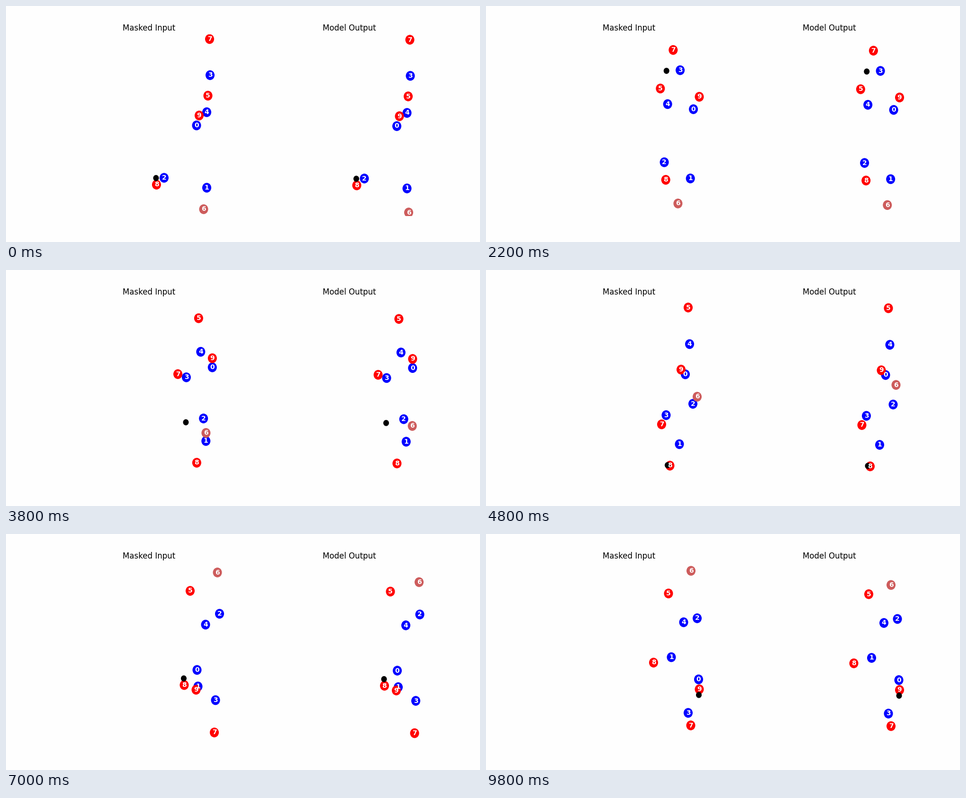
Write a matplotlib script that moves like this. It is 1000 px wide and 500 px high and loops after 10 s.

```python
import numpy as np
import matplotlib.pyplot as plt
from matplotlib.animation import FuncAnimation
from matplotlib.patches import Ellipse

WIDTH, HEIGHT = 1000, 500
FRAMES, INTERVAL = 50, 200
NOW = np.arange(FRAMES)
KEYS = np.array([0, 7, 14, 24, 35, 42, 49])
MASKED = 6
OUTPUT_SHIFT = (422.5, 1.5)

# Where each player runs: one stage position per key time.
ROUTES = [
    [(402, 253), (424.5, 239), (443.5, 206), (420.5, 221), (403, 288), (437, 289), (448.5, 308)],
    [(423.5, 385), (426, 380), (433, 356), (408, 369), (405, 323), (390, 270.5), (391, 261)],
    [(333.5, 364), (356, 330), (392, 331.5), (436.5, 283.5), (450.5, 169), (445.5, 153.5), (445.5, 178.5)],
    [(430.5, 146.5), (429, 131), (394.5, 152), (380, 307.5), (442, 352), (431, 381.5), (426.5, 379)],
    [(423.5, 225), (382, 219.5), (390.5, 197), (429.5, 157), (421, 192), (415, 190), (417, 187)],
    [(426, 190), (363.5, 211), (380, 142), (426.5, 79.5), (388.5, 120.5), (385, 126), (385, 126)],
    [(417, 430.5), (413.5, 427), (402, 403), (445.5, 268.5), (446, 81.5), (429.5, 79), (432.5, 78)],
    [(429.5, 70), (425, 75), (373, 120.5), (370.5, 327), (439.5, 420.5), (421.5, 423.5), (432, 405.5)],
    [(317.5, 378.5), (343, 351), (402.5, 385.5), (388, 414.5), (376, 320), (368.5, 268), (353.5, 272.5)],
    [(407.5, 232), (437.5, 211), (453.5, 182.5), (411.5, 211), (401, 330), (436, 298), (450, 329)],
]
# The model's guess for the masked player.
GUESS = [(849.5, 437.5), (845, 432), (849.5, 403.5), (865, 243.5), (871.5, 102), (867.5, 89.5), (854.5, 108)]
# Who has the ball at each key time.
CARRIERS = [8, 5, 7, 8, 8, 7, 9]


def key_progress():
    """Index of the current key interval and how far through it each frame is."""
    i = np.clip(np.searchsorted(KEYS, NOW, side="right") - 1, 0, len(KEYS) - 2)
    return i, ((NOW - KEYS[i]) / (KEYS[i + 1] - KEYS[i]))[:, None]


def smooth_path(route):
    """Cubic Hermite path through a route, sampled at every frame."""
    pos = np.array(route, float)
    slope = np.gradient(pos, KEYS, axis=0)
    i, u = key_progress()
    step = (KEYS[i + 1] - KEYS[i])[:, None]
    return ((1 + 2 * u) * (1 - u) ** 2 * pos[i] + u * (1 - u) ** 2 * step * slope[i]
            + u ** 2 * (3 - 2 * u) * pos[i + 1] + u ** 2 * (u - 1) * step * slope[i + 1])


def ball_path(paths):
    """The ball is passed between carriers and swings around whoever has it."""
    i, u = key_progress()
    carriers = np.array(CARRIERS)
    stack = np.array(paths)
    held = (1 - u) * stack[carriers[i], NOW] + u * stack[carriers[i + 1], NOW]
    phase = np.pi / 2 * (i + u[:, 0])
    swing = np.column_stack([-1 - 4 * np.sin(phase) ** 2, -1 - 13 * np.cos(phase)])
    return held + swing


fig, axes = plt.subplots(1, 2, figsize=(WIDTH / 100, HEIGHT / 100), dpi=100,
                         facecolor="#fefefe")
movers = []


def add_disc(ax, radius, color, zorder):
    """Circle in unit axes, so it takes on the panel's aspect ratio."""
    box = ax.get_position()
    return ax.add_patch(Ellipse((0, 0), 2 * radius * box.width * WIDTH,
                                2 * radius * box.height * HEIGHT,
                                color=color, zorder=zorder))


def player_color(n):
    if n == MASKED:
        return "indianred"
    return "blue" if n < 5 else "red"


def build_panel(ax, title, paths):
    box = ax.get_position()
    ax.set_xlim(box.x0 * WIDTH, box.x1 * WIDTH)
    ax.set_ylim((1 - box.y0) * HEIGHT, (1 - box.y1) * HEIGHT)
    ax.axis("off")
    ax.set_title(title, fontsize=12)
    for n, path in enumerate(paths):
        label = ax.text(0, 0, str(n), color="white", fontsize=10, weight="bold",
                        ha="center", va="center", zorder=3)
        movers.append((add_disc(ax, 0.025, player_color(n), 1), label, path))
    movers.append((add_disc(ax, 0.015, "black", 2), None, ball_path(paths)))


inputs = [smooth_path(route) for route in ROUTES]
outputs = [path + OUTPUT_SHIFT for path in inputs]
outputs[MASKED] = smooth_path(GUESS)
build_panel(axes[0], "Masked Input", inputs)
build_panel(axes[1], "Model Output", outputs)


def draw(frame):
    for disc, label, path in movers:
        disc.center = path[frame]
        if label:
            label.set_position(path[frame])
    return []


anim = FuncAnimation(fig, draw, frames=FRAMES, interval=INTERVAL, repeat=True,
                     repeat_delay=0, init_func=lambda: draw(0))
plt.show()
```
